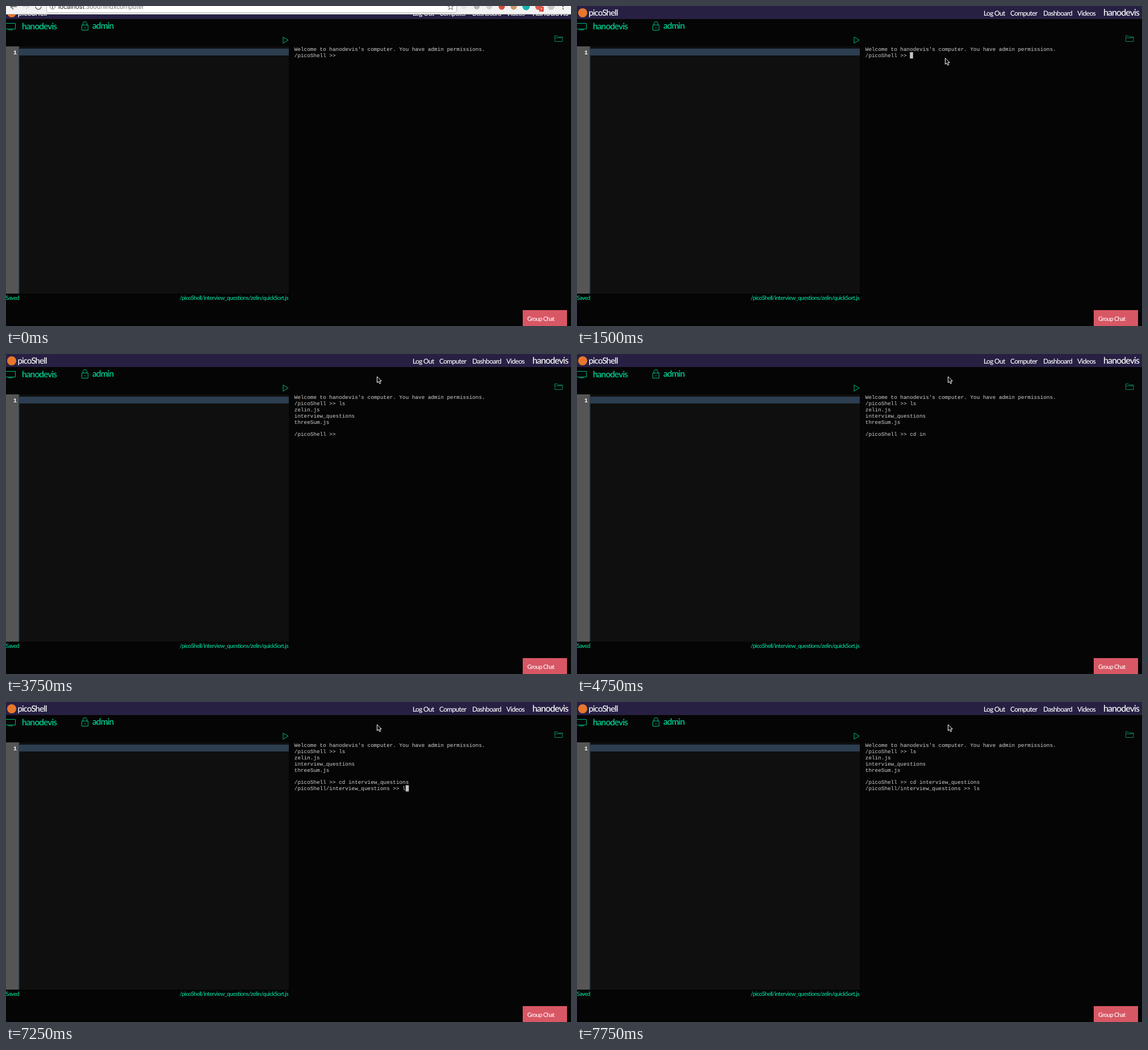
Recreate the animation shown at these times as an HTML page. Size 995 px wide and 563 px high, loop 8000 ms.

```html
<!DOCTYPE html>
<html lang="en">
<head>
<meta charset="utf-8">
<title>picoShell</title>
<style>
  html, body { margin: 0; width: 100%; height: 100%; overflow: hidden; background: #050505; }
  svg { display: block; width: 100%; height: 100%; }
  text { font-family: Lato, sans-serif; font-weight: 500; letter-spacing: -.058em; text-rendering: geometricPrecision; white-space: pre; }
  .nav text { fill: #fff; font-size: 12px; }
  .nav .big { font-size: 16px; }
  .tool { fill: #00d99a; font-size: 15.5px; }
  .small { fill: #00d99a; font-size: 10.2px; }
  .icon { fill: none; stroke: #00b882; stroke-width: 1; }
  .dim { stroke: #08845f; }
  #term text { font: 9.333px "Liberation Mono", monospace; letter-spacing: 0; fill: #d2d2d2; }
  #chrome text { font: 11.3px Roboto, sans-serif; letter-spacing: 0; }
  #chrome path { fill: none; stroke-width: 1.5; }
</style>
</head>
<body>
<svg viewBox="0 0 995 563" preserveAspectRatio="none">
  <rect width="995" height="563" fill="#050505"/>

  <g class="nav">
    <rect width="995" height="23" fill="#272043"/>
    <rect id="edge" width="995" height="1" fill="#4b4760"/>
    <circle cx="10" cy="12" r="8" fill="#e8762c"/>
    <text x="20.5" y="17" style="font-size:15px">picoShell</text>
    <text x="716" y="16.5">Log Out</text>
    <text x="763" y="16.5">Computer</text>
    <text x="821" y="16.5">Dashboard</text>
    <text x="881" y="16.5">Videos</text>
    <text class="big" x="927" y="17">hanodevis</text>
  </g>

  <path class="icon" d="M0 30.5H16.5V40.5H0M4 42H12"/>
  <text class="tool" x="28" y="41">hanodevis</text>
  <path class="icon" d="M133.500 33.500h11v9h-11zM135.500 33.500v-2.500a3.500 3.500 0 0 1 7 0v2.500M139 37v2.500"/>
  <text class="tool" x="152" y="40">admin</text>
  <path class="icon" d="M488 54.500L497 60L488 65.500Z"/>
  <path class="icon dim" d="M966.500 62.500V52.500h4.500l1.500 2h7.500v8zM966.500 56h13.500"/>

  <rect x="23" y="71" width="475" height="435" fill="#0f0f0f"/>
  <rect y="71" width="22" height="435" fill="#555"/>
  <rect x="22" y="71" width="1.500" height="435" fill="#2c3e50"/>
  <rect x="23" y="75" width="475" height="12" fill="#2c3e50"/>
  <text x="13" y="85" fill="#fff" style="font:bold 10px 'Liberation Mono',monospace">1</text>

  <text class="small" x="-.5" y="517">Saved</text>
  <text class="small" x="497" y="517" text-anchor="end">/picoShell/interview_questions/zelin/quickSort.js</text>
  <rect x="910" y="535" width="78" height="28" fill="#d85765"/>
  <text x="918" y="554" fill="#fff" style="font-size:10.5px">Group Chat</text>

  <g id="term"><rect id="caret" width="5.600" height="11" fill="#c4c4c4"/></g>

  <g id="chrome">
    <rect width="995" height="15" fill="#f2f2f2"/>
    <rect y="14" width="995" height="1" fill="#a9a9a9"/>
    <rect x="71.500" y="-12" width="722" height="23.500" rx="3" fill="#fff" stroke="#b9b9b9"/>
    <path stroke="#666" d="M19 1H8M13 6L8 1L13 -4M52 1a5 5 0 0 0 10 0"/>
    <path stroke="#d4d4d4" d="M29 1H40M35 6L40 1L35 -4"/>
    <circle cx="82" cy="1" r="4.500" fill="none" stroke="#666"/>
    <path stroke="#666" d="M82 0V4"/>
    <text x="92" y="5" fill="#222">localhost<tspan fill="#777">:3000/linuxcomputer</tspan></text>
    <path stroke="#666" style="stroke-width:1" d="M778 0h3.500L783 -4L784.500 0H788L785 2.500L786.500 6.500L783 4L779.500 6.500L781 2.500Z"/>
  </g>

  <path id="mouse" fill="#000" stroke="#fff" d="M.5 .8V11.500L3 9.300L4.800 13.300L6.700 12.400L5 8.600H8.300Z"/>
</svg>
<script>
const LOOP = 8000, COL = 5.6, ROW = 10.86, LEFT = 507.8, TOP = 70.4;
const $ = id => document.getElementById(id);

function add(parent, tag, attrs) {
  const el = document.createElementNS('http://www.w3.org/2000/svg', tag);
  for (const key in attrs) el.setAttribute(key, attrs[key]);
  return parent.appendChild(el);
}

// Toolbar buttons: centre x, radius, colour
[[806, 5, '#e4e4e4'], [829, 5, '#b5b5b5'], [851, 5, '#cfcfcf'], [873, 5.5, '#d94b3d'],
 [894, 5.5, '#c99a6b'], [916, 6.5, '#12b5ac'], [938, 6, '#dc5a50'], [960, 6, '#c6c6c6']]
  .forEach(([cx, r, fill]) => add($('chrome'), 'circle', { cx, cy: 1, r, fill }));
[1, 5].forEach(cy => add($('chrome'), 'circle', { cx: 981, cy, r: 1.2, fill: '#666' }));
add($('chrome'), 'rect', { x: 939, y: 1, width: 8, height: 9, rx: 1, fill: '#d8483e' });
add($('chrome'), 'text', { x: 940.5, y: 9, fill: '#fff', style: 'font-size:8px' }).textContent = '?';

const PROMPT = '/picoShell >> ';
const intro = ["Welcome to hanodevis's computer. You have admin permissions."];
const listed = [...intro, PROMPT + 'ls', 'zelin.js', 'interview_questions', 'threeSum.js', ''];
const entered = [...listed, PROMPT + 'cd interview_questions'];
const INNER = '/picoShell/interview_questions >> ';

// Start time, finished lines, current line, caret visible
const screens = [
  [0, intro, PROMPT, 0],
  [1250, intro, PROMPT, 1],
  [1750, intro, PROMPT, 0],
  [2000, intro, PROMPT + 'l', 0],
  [2250, listed.slice(0, 2), PROMPT, 1],
  [2750, listed.slice(0, 2), PROMPT, 0],
  [3000, listed, PROMPT, 0],
  [3250, listed, PROMPT, 1],
  [3750, listed, PROMPT, 0],
  [4250, listed, PROMPT, 1],
  [4500, listed, PROMPT + 'cd ', 1],
  [4750, listed, PROMPT + 'cd in', 0],
  [5000, listed, PROMPT + 'cd inter', 0],
  [5250, listed, PROMPT + 'cd inter', 1],
  [5750, listed, PROMPT + 'cd interview_questions', 0],
  [6250, entered, PROMPT, 1],
  [6750, entered, INNER, 0],
  [7250, entered, INNER + 'l', 1],
  [7500, entered, INNER + 'ls', 1],
  [7750, entered, INNER + 'ls', 0]
];

// Start time, pointer x, y
const pointer = [
  [0, -50, -50], [250, 697, 234], [500, 693, 199], [750, 688, 162],
  [1000, 670, 117], [1500, 648, 91], [1750, 653, 39]
];

const rows = Array.from({ length: 8 }, (_, i) =>
  add($('term'), 'text', { x: LEFT, y: 79.1 + ROW * i }));
const current = (steps, t) => steps.filter(step => step[0] <= t).pop();
const show = (id, on) => $(id).setAttribute('visibility', on ? 'visible' : 'hidden');

let shown;
function draw(t) {
  const [, x, y] = current(pointer, t);
  $('mouse').setAttribute('transform', `translate(${x} ${y})`);
  show('chrome', t < 250);
  show('edge', t < 500);

  const screen = current(screens, t);
  if (screen === shown) return;
  shown = screen;
  const [, done, line, caretOn] = screen;
  const lines = [...done, line];
  rows.forEach((row, i) => { row.textContent = lines[i] || ''; });
  $('caret').setAttribute('x', LEFT + COL * line.length);
  $('caret').setAttribute('y', TOP + ROW * done.length);
  show('caret', caretOn);
}

const start = performance.now();
function tick() {
  draw((performance.now() - start) % LOOP);
  requestAnimationFrame(tick);
}
tick();
</script>
</body>
</html>
```
